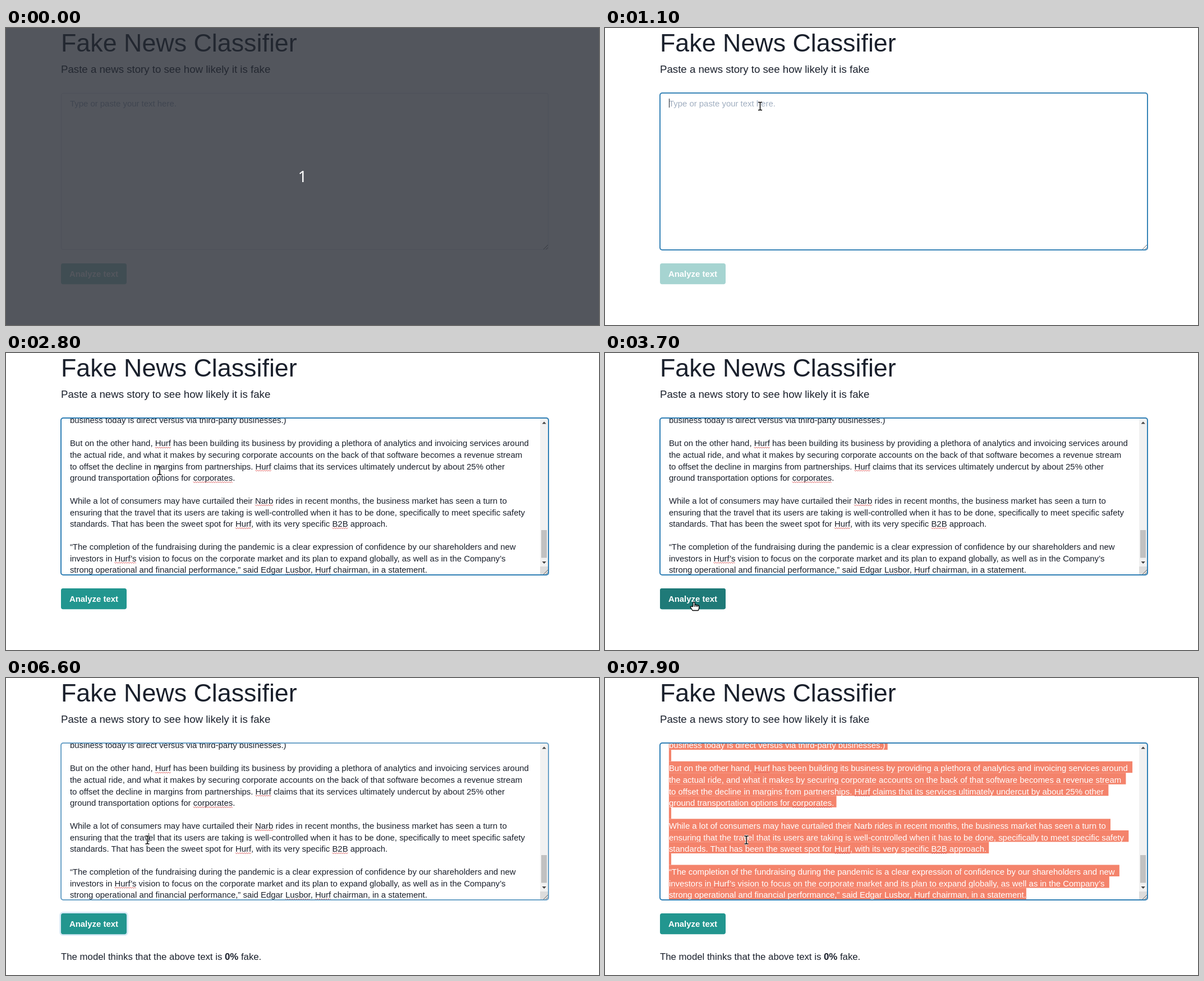
Animation, 1057 px wide and 530 px high, one loop 8000 ms. Source, as an HTML page:

```html
<!DOCTYPE html>
<html lang="en">
<head>
<meta charset="utf-8">
<title>Fake News Classifier</title>
<style>
  html, body { margin: 0; width: 100%; height: 100%; overflow: hidden; background: #fff; }
  svg { display: block; font: 14.933px "Liberation Sans", Arial, sans-serif; fill: #1a202c; }
  .frame { fill: none; }
  .squiggle { fill: none; stroke: #d64545; stroke-width: .9; }
  .line.selected { fill: #fff; }
  .mark { fill: #f4836b; visibility: hidden; }
  .mark.selected { visibility: visible; }
</style>
</head>
<body>
<svg width="1057" height="530" viewBox="0 0 1057 530">
  <defs>
    <clipPath id="inside"><rect x="99" y="117" width="853" height="278.5"/></clipPath>
  </defs>

  <text x="98" y="41.7" font-size="44.8">Fake News Classifier</text>
  <text x="98" y="80.2" font-size="18.667">Paste a news story to see how likely it is fake</text>

  <text id="hint" x="113.9" y="139.8" fill="#a0aec0">Type or paste your text here.</text>
  <g id="story">
    <g id="lines" clip-path="url(#inside)"></g>
    <path fill="#f1f1f1" d="M952 117h14v264h-14z"/>
    <path fill="#dcdcdc" d="M952 381h14v14h-14z"/>
    <path fill="#c1c1c1" d="M954 316h10v49.500h-10z"/>
    <path fill="#444" d="M955.500 126.500l3.700-4 3.700 4zM955.500 372l3.700 4 3.700-4z"/>
  </g>
  <path class="frame" stroke="#666" d="M958 395l8-8M962.500 395l3.500-3.500"/>
  <rect id="caret" width="1" height="16"/>

  <rect class="frame" x="98.5" y="116.5" width="868" height="279" rx="3.5" stroke="#e2e8f0"/>
  <rect class="frame" id="boxHover" x="98.5" y="116.5" width="868" height="279" rx="3.5" stroke="#cbd5e0"/>
  <rect class="frame" id="boxFocus" x="98" y="116" width="869" height="280" rx="4" stroke="#2f7fb5" stroke-width="2"/>

  <g id="button">
    <rect class="frame" id="ring" x="96.6" y="418.6" width="119.8" height="39.8" rx="5" stroke="#83bde0" stroke-width="2.8"/>
    <rect x="98" y="420" width="117" height="37.3" rx="3.7" fill="#22968f"/>
    <rect id="btnHover" x="98" y="420" width="117" height="37.3" rx="3.7" fill="#1f7a78"/>
    <rect id="btnDown" x="98" y="420" width="117" height="37.3" rx="3.7" fill="#285e61"/>
    <text x="112.9" y="444.2" font-weight="bold" fill="#fff">Analyze text</text>
  </g>

  <text id="result" x="98" y="502.7" font-size="16.8">The model thinks that the above text is <tspan font-weight="bold">0%</tspan> fake.</text>

  <g id="cursor">
    <path id="arrow" stroke="#fff" fill="#000" d="M0 0v16l3.800-3.600 2.700 6.200 2.500-1.100-2.700-6h5.200z"/>
    <g id="beam" fill="none">
      <path stroke="#fff" stroke-width="3.4" d="M-3.500-7h2.500l1 1 1-1h2.500M0-6V6M-3.500 7h2.500l1-1 1 1h2.500"/>
      <path stroke="#000" stroke-width="1.5" d="M-3.500-7h2.500l1 1 1-1h2.500M0-6V6M-3.500 7h2.500l1-1 1 1h2.500"/>
    </g>
    <path id="hand" fill="#fff" stroke="#000" stroke-width="1.3" stroke-linejoin="round"
      d="M-1.500 8V1.500q1.500-2.500 3 0V6q1.500-1.500 2.800 0 1.500-1 2.700.500 2-.500 2.200 1.500v3.500l-1.500 4H-2.500l-3.800-6q.500-2 2.600-1zM1.500 6v3M4.300 6.500v2.500M6.800 7v2"/>
  </g>

  <g id="countdown">
    <rect width="1057" height="530" fill="#252932" fill-opacity=".79"/>
    <text x="528.5" y="275" fill="#fff" text-anchor="middle" style="font: 28px 'Noto Sans', 'Open Sans', sans-serif">1</text>
  </g>
</svg>

<script>
const $ = id => document.getElementById(id);
const LEFT = 113.9, PITCH = 20.533, FIRST = 125.4;

// Underscores enclose misspelt words; * marks those found at once. A trailing ~ is a soft wrap.
const STORY = `business today is direct versus via third-party businesses.)

But on the other hand, _Hurf_ has been building its business by providing a plethora of analytics and invoicing services around~
the actual ride, and what it makes by securing corporate accounts on the back of that software becomes a revenue stream~
to offset the decline in margins from partnerships. _Hurf_ claims that its services ultimately undercut by about 25% other~
ground transportation options for _corporates_.

While a lot of consumers may have curtailed their _Narb_ rides in recent months, the business market has seen a turn to~
ensuring that the travel that its users are taking is well-controlled when it has to be done, specifically to meet specific safety~
standards. That has been the sweet spot for _Hurf_, with its very specific _B2B_ approach.

“The completion of the fundraising during the pandemic is a clear expression of confidence by our shareholders and new~
investors in _*Hurf’s_ vision to focus on the corporate market and its plan to expand globally, as well as in the Company’s~
strong operational and financial performance,” said Edgar _*Lusbor_, _*Hurf_ chairman, in a statement.`.split("\n");

function add(tag, attrs, text = "") {
  const el = document.createElementNS("http://www.w3.org/2000/svg", tag);
  for (const key in attrs) el.setAttribute(key, attrs[key]);
  el.textContent = text;
  return $("lines").appendChild(el);
}

function zigzag(x, end, y) {
  let d = `M${x} ${y}`;
  for (let up = false; x < end - 1; up = !up) d += `l2 ${up ? -2 : 2}`, x += 2;
  return d;
}

let storyEnd;
const late = [];
const rows = STORY.map((raw, i) => {
  const y = FIRST + i * PITCH;
  const mark = add("rect", { class: "mark", x: LEFT, y: y - 17.8, height: PITCH });
  const line = add("text", { class: "line", x: LEFT, y }, raw.replace(/[_*~]/g, ""));
  const width = line.getComputedTextLength();
  const extra = i == STORY.length - 1 ? 0 : raw.endsWith("~") ? 8.3 : 4.15;
  mark.setAttribute("width", width + extra);
  storyEnd = LEFT + width;
  let pos = 0;
  raw.split("_").forEach((part, n) => {
    const word = part.replace(/[*~]/g, "");
    if (n % 2) {
      const from = line.getStartPositionOfChar(pos).x;
      const to = line.getEndPositionOfChar(pos + word.length - 1).x;
      const wave = add("path", { class: "squiggle", d: zigzag(from, to, y + 1.5) });
      if (part[0] != "*") late.push(wave);
    }
    pos += word.length;
  });
  return [mark, line];
});

const PATH = [
  [500, "arrow", 330, 420], [600, "beam", 312, 330], [700, "beam", 290, 215], [800, "beam", 276.5, 139.5],
  [2800, "beam", 274, 210], [2900, "beam", 265, 335], [3000, "arrow", 247, 447],
  [3200, "arrow", 226, 484], [3300, "arrow", 196, 491], [3400, "hand", 166, 453], [3500, "hand", 158.5, 444],
  [6200, "beam", 190, 388], [6300, "beam", 226, 330], [6400, "beam", 252, 289]
];

const show = (id, on) => $(id).style.visibility = on ? "visible" : "hidden";
const fade = (id, value) => $(id).style.opacity = value;

function draw(t) {
  const within = (a, b) => t >= a && t < b;
  // Eased three-step transition beginning at the given time
  const ramp = at => 1 - (1 - Math.min(1, Math.max(0, (t - at + 100) / 300))) ** 2.7;
  const pasted = t >= 1900;

  $("countdown").style.display = t < 200 ? "" : "none";
  $("hint").style.display = pasted ? "none" : "";
  $("story").style.display = pasted ? "" : "none";
  show("result", t >= 4400);
  late.forEach(wave => wave.style.visibility = t >= 2800 ? "visible" : "hidden");

  fade("boxHover", ramp(600) - ramp(3000) + ramp(6200));
  fade("boxFocus", ramp(1000) - ramp(4000) + ramp(6600));
  fade("button", .4 + .6 * ramp(1900));
  fade("btnHover", ramp(3300) - ramp(6200));
  fade("btnDown", ramp(4000) - ramp(4300));
  fade("ring", ramp(4000) - ramp(6600));

  const caret = within(1000, 1900) ? [LEFT, 126]
    : within(1900, 2500) || within(3100, 3700) ? [storyEnd + .5, 379]
    : within(6600, 7200) ? [254, 277] : null;
  show("caret", caret);
  if (caret) {
    $("caret").setAttribute("x", Math.round(caret[0]));
    $("caret").setAttribute("y", caret[1]);
  }

  rows.forEach((row, i) => {
    const selected = t >= 7900 || t >= 7200 && i > 6 && i < 10;
    row.forEach(el => el.classList.toggle("selected", selected));
  });

  const pose = PATH.findLast(p => p[0] <= t);
  for (const kind of ["arrow", "beam", "hand"]) show(kind, pose && pose[1] == kind);
  if (pose) $("cursor").setAttribute("transform", `translate(${pose[2]} ${pose[3]})`);
}

function tick() {
  draw(Math.floor(performance.now() % 8000 / 100) * 100);
  requestAnimationFrame(tick);
}
tick();
</script>
</body>
</html>
```
